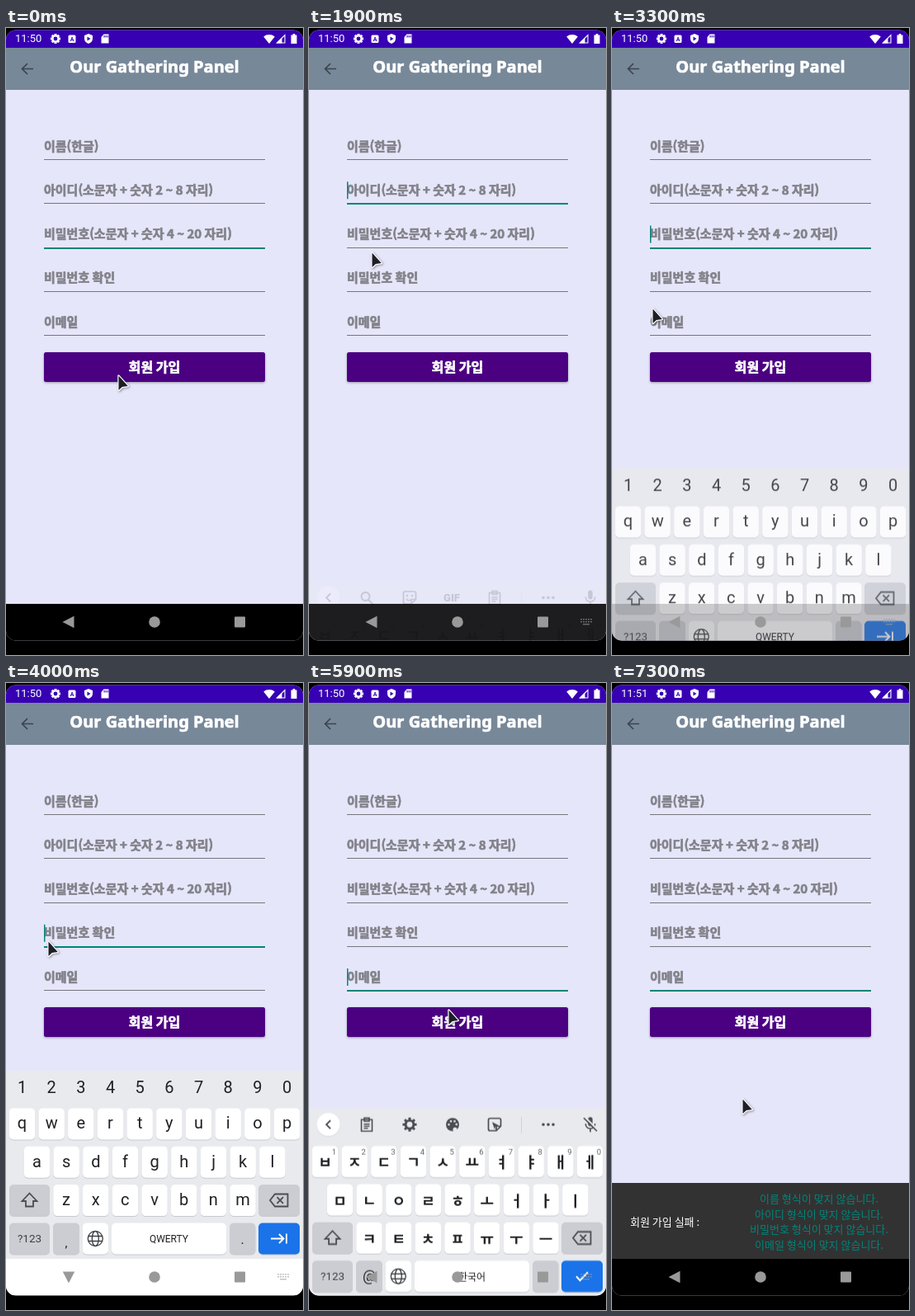
Animation of 360 by 760 pixels, one loop 7400 ms. Source, as an HTML page with a canvas:

```html
<!DOCTYPE html>
<html lang="ko">
<head>
<meta charset="utf-8">
<style>
html, body { margin: 0; width: 100%; height: 100%; overflow: hidden; background: #000; }
canvas { display: block; width: 360px; height: 760px; }
</style>
</head>
<body>
<canvas id="stage"></canvas>
<script>
const LOOP = 7400, STEP = 100, KB_TOP = 470, KB_H = 272, NAV = 698;
const KR = '"Noto Sans CJK KR", "Noto Sans CJK", sans-serif';
const LATIN = 'Roboto, sans-serif';
const TEAL = '#00857a', INK = '#202124', GREY = '#4a4d52';
const scale = window.devicePixelRatio || 1;

function makeLayer(canvas, w, h) {
  canvas.width = w * scale;
  canvas.height = h * scale;
  const c = canvas.getContext('2d');
  c.scale(scale, scale);
  return c;
}
const screen = makeLayer(document.getElementById('stage'), 360, 760);
const kbCanvas = document.createElement('canvas');
const kb = makeLayer(kbCanvas, 360, KB_H);
let g = screen;

const clamp = v => Math.max(0, Math.min(1, v));
const mix = (a, b, u) => a + (b - a) * u;

// cubic-bezier(.2, 0, 0, 1)
function ease(x) {
  if (x <= 0) return 0;
  if (x >= 1) return 1;
  let lo = 0, hi = 1;
  for (let i = 0; i < 24; i++) {
    const m = (lo + hi) / 2;
    if (.6 * m * (1 - m) ** 2 + m ** 3 < x) lo = m; else hi = m;
  }
  return 3 * lo * lo - 2 * lo ** 3;
}

function rect(x, y, w, h, color, r = 0) {
  g.fillStyle = color;
  g.beginPath();
  g.roundRect(x, y, w, h, r);
  g.fill();
}
function disc(x, y, r, color) {
  g.fillStyle = color;
  g.beginPath();
  g.arc(x, y, r, 0, 7);
  g.fill();
}
function text(s, x, y, size, color, align = 'left', family = LATIN, weight = 400) {
  g.font = `${weight} ${size}px ${family}`;
  g.fillStyle = color;
  g.textAlign = align;
  g.textBaseline = 'middle';
  g.fillText(s, x, y);
}
// extra-bold display lettering
function heavy(s, x, y, size, color, align, family) {
  text(s, x, y, size, color, align, family, 700);
  g.strokeStyle = color;
  g.lineWidth = .7;
  g.lineJoin = 'round';
  g.strokeText(s, x, y);
}
// SVG path centred on x, y; filled, or stroked when a width is given
function icon(d, x, y, color, width = 0, angle = 0) {
  g.save();
  g.translate(x, y);
  g.rotate(angle);
  const p = new Path2D(d);
  if (width) {
    g.strokeStyle = color;
    g.lineWidth = width;
    g.stroke(p);
  } else {
    g.fillStyle = color;
    g.fill(p, 'evenodd');
  }
  g.restore();
}
function gear(x, y, r, color, hole) {
  for (let i = 0; i < 4; i++) icon(`M${-r} -1.5H${r}V1.5H${-r}Z`, x, y, color, 0, i * Math.PI / 4);
  disc(x, y, r * .75, color);
  disc(x, y, r * .4, hole);
}

// ---- app ----

const FIELDS = ['이름(한글)', '아이디(소문자 + 숫자 2 ~ 8 자리)',
  '비밀번호(소문자 + 숫자 4 ~ 20 자리)', '비밀번호 확인', '이메일'];
const FOCUS = [[0, 2], [400, 0], [1800, 1], [3100, 2], [4000, 3], [5600, 4]];

function statusBar(t) {
  rect(0, 0, 360, 24, '#3700b3');
  text(t < 6400 ? '11:50' : '11:51', 11, 13.5, 13, '#fff');
  gear(60, 13, 6, '#fff', '#3700b3');
  rect(75.5, 8.5, 9, 9.5, '#fff', 1.5);
  text('A', 80, 13.6, 7, '#3700b3', 'center', LATIN, 700);
  icon('M0 -6L5 -4V0C5 3 3 5 0 6C-3 5 -5 3 -5 0V-4Z', 100, 13, '#fff');
  icon('M-1.5 -2.5L2.5 0L-1.5 2.5Z', 100, 13, '#3700b3');
  icon('M-4.5 -2L-1.5 -5.5H4.5V5.5H-4.5ZM-1.5 -4V-1.5H-.4V-4ZM.6 -4V-1.5H1.6V-4ZM2.6 -4V-1.5H3.6V-4Z', 120, 13, '#fff');
  icon('M0 5.5L-6.8 -3C-3 -6.3 3 -6.3 6.8 -3Z', 319, 13.5, '#fff');
  icon('M5 -4.5V5H-4.5Z', 333, 13, '#fff', 1.1);
  icon('M1.5 -1.5V5.5H-5.5Z', 333, 13, '#fff');
  icon('M-3.5 -4.5H-1.3V-6H1.3V-4.5H3.5V6H-3.5Z', 349, 13, '#fff');
}

function button() {
  g.save();
  g.shadowColor = 'rgba(0,0,0,.35)';
  g.shadowBlur = 3 * scale;
  g.shadowOffsetY = scale;
  rect(46, 393, 268, 36, '#4b0082', 2.5);
  g.restore();
  heavy('회원 가입', 180, 410.5, 16, '#fff', 'center', KR);
}

function form(t) {
  rect(0, 24, 360, 51, '#778899');
  icon('M7 0H-6M0 -6.5L-6.5 0L0 6.5', 26, 49.5, '#3b454e', 1.7);
  heavy('Our Gathering Panel', 180, 48.5, 20, '#fff', 'center', '"Noto Sans", sans-serif');

  const [since, focused] = FOCUS.filter(f => f[0] <= t).pop();
  FIELDS.forEach((label, i) => {
    const y = 143 + i * 53.25;
    heavy(label, 46, y, 15, '#82828a', 'left', KR);
    const line = Math.round(y + 16);
    if (i === focused) rect(46, line, 268, 2, TEAL);
    else rect(46, line, 268, 1, '#76767f');
    const caretOn = since > 0 && (t - since) % 1000 < 500;
    if (i === focused && caretOn) rect(46, y - 10, 1.5, 21, TEAL);
  });
  button();
}

function snackbar(t) {
  const y = 606 + 92 * (1 - ease((t - 6720) / 250));
  if (y >= NAV) return;
  rect(0, y, 360, 92, '#323232');
  text('회원 가입 실패 :', 22, y + 47, 13, '#fff', 'left', KR);
  ['이름', '아이디', '비밀번호', '이메일'].forEach((name, i) =>
    text(`${name} 형식이 맞지 않습니다.`, 251, y + 19 + i * 18.7, 13, TEAL, 'center', KR));
}

// ---- keyboard ----

const ROWS = {
  ko: ['ㅂㅈㄷㄱㅅㅛㅕㅑㅐㅔ', 'ㅁㄴㅇㄹㅎㅗㅓㅏㅣ', 'ㅋㅌㅊㅍㅠㅜㅡ'],
  en: ['qwertyuiop', 'asdfghjkl', 'zxcvbnm']
};
const SHOWS = [
  { from: 450, until: 1050, layout: 'ko' },
  { from: 1864, until: 2450, layout: 'ko' },
  { from: 3197, until: 4453, layout: 'en' },
  { from: 5776, until: 6350, layout: 'mail' }
];

function key(x, y, w, color = '#fff') {
  rect(x, y - 18, w, 38, '#c8cacf', 5);
  rect(x, y - 19, w, 38, color, 5);
}
function clipboard(x, y) {
  icon('M-6.5 -6H6.5V8H-6.5ZM-3 -6V-8H3V-4H-3ZM-3.5 -.5H3.5M-3.5 2H3.5M-3.5 4.5H1.5', x, y, GREY, 1.6);
}
function mic(x, y, off) {
  rect(x - 2.7, y - 9, 5.4, 11, GREY, 2.7);
  icon('M-5.7 -1C-5.7 7 5.7 7 5.7 -1M0 5V9', x, y, GREY, 1.7);
  if (off) {
    icon('M-8 -8L8 8', x + 1.3, y - 1.3, '#e8eaed', 2);
    icon('M-8 -8L8 8', x, y, GREY, 1.7);
  }
}
function sticker(x, y) {
  icon('M-5.5 -7.5H5.5Q7.5 -7.5 7.5 -5.5V2L2 7.5H-5.5Q-7.5 7.5 -7.5 5.5V-5.5Q-7.5 -7.5 -5.5 -7.5ZM7.5 2H2V7.5', x, y, GREY, 1.7);
}
function toolbar(mail) {
  const y = 19.5;
  disc(23.5, y + .8, 14, '#d0d3d7');
  disc(23.5, y, 14, '#fff');
  icon('M2.5 -5L-2.5 0L2.5 5', 23.5, y, GREY, 1.8);
  if (mail) {
    clipboard(70, y);
    gear(122, y, 8.5, GREY, '#e8eaed');
    disc(174, y, 8, GREY);
    [[-4.5, 0], [-2, -4], [2.5, -4], [4.8, -.2]].forEach(([dx, dy]) => disc(174 + dx, y + dy, 1.3, '#e8eaed'));
    disc(177, y + 6, 2.6, '#e8eaed');
    sticker(225, y);
    icon('M-3 -3L5 1L1 2L0 6Z', 225, y, GREY);
  } else {
    icon('M3.5 -1.5A5 5 0 1 1 -6.5 -1.5A5 5 0 1 1 3.5 -1.5M2 2.5L8 8.5', 70, y, GREY, 1.9);
    sticker(122, y);
    disc(119, y - 2.5, 1.2, GREY);
    disc(125, y - 2.5, 1.2, GREY);
    icon('M-4 1C-3 4 1 4 2 2', 122, y, GREY, 1.4);
    text('GIF', 173, y + .5, 13, GREY, 'center', LATIN, 900);
    clipboard(225, y);
  }
  rect(257, 10, 1, 20, '#cfd2d6');
  [-6, 0, 6].forEach(dx => disc(290 + dx, y, 1.8, GREY));
  mic(341, y, mail);
}

function keyboard(layout) {
  const english = layout === 'en', mail = layout === 'mail';
  const mod = '#cbcdd2', pitch = 35.67;
  rect(0, 0, 360, KB_H, '#e8eaed');
  if (english) [...'1234567890'].forEach((d, i) => text(d, 19.5 + i * pitch, 21.5, 20, INK, 'center'));
  else toolbar(mail);

  ROWS[english ? 'en' : 'ko'].forEach((row, r) => {
    const y = 64.5 + r * 46.3, x0 = [19.5, 37.5, 73][r];
    [...row].forEach((ch, i) => {
      const x = x0 + i * pitch;
      key(x - 15.7, y, 31.4);
      if (english) text(ch, x, y, 20, INK, 'center');
      else {
        text(ch, x, y + 1, 18, INK, 'center', KR, 700);
        if (r === 0) text((i + 1) % 10, x + 11, y - 11.5, 9.5, '#5f6368', 'center');
      }
    });
  });

  const y3 = 157, y4 = 203.5;
  key(4, y3, 49, mod);
  icon('M0 -8.5L9 1H4.5V7.5H-4.5V1H-9Z', 28.5, y3, GREY, 1.8);
  key(306, y3, 50, mod);
  icon('M-11 0L-5 -7.5H10.5V7.5H-5ZM-2.5 -3.8L5 3.8M5 -3.8L-2.5 3.8', 331, y3, GREY, 1.8);

  key(4, y4, 49, mod);
  text('?123', 28.5, y4 + .5, 13.5, '#3c4043', 'center');
  key(57, y4, 32, mod);
  if (mail) text('@', 73, y4, 18, INK, 'center');
  else text(',', 73, y4 + 6, 15, INK, 'center');
  if (layout === 'ko')
    icon('M4.5 0A4.5 4.5 0 1 1 -4.5 0A4.5 4.5 0 1 1 4.5 0M-2.3 1C-1.5 3 1.5 3 2.3 1M-1.7 -2V-.8M1.7 -2V-.8', 73, y4 - 8, GREY, 1);
  key(92.7, y4, 31.4);
  icon('M9 0A9 9 0 1 1 -9 0A9 9 0 1 1 9 0M4 0A4 9 0 1 1 -4 0A4 9 0 1 1 4 0M-8 -3H8M-8 3H8', 108.3, y4, '#3c4043', 1.3);
  key(128, y4, 139);
  text(english ? 'QWERTY' : '한국어', 197.5, y4 + .5, 12, INK, 'center', english ? LATIN : KR);
  key(271, y4, 31.4, mod);
  text('.', 286.7, y4 + 2, 16, INK, 'center');
  key(306, y4, 50, '#1a73e8');
  icon(mail ? 'M-7 0L-2.5 5L7 -5' : 'M-10 0H5M0 -5.5L5.5 0L0 5.5M9 -6V6', 331, y4, '#fff', 1.9);
  rect(0, 228, 360, 44, '#fff');
}

function keyboardState(t) {
  const show = SHOWS.find(s => t >= s.from && t < s.until + 300);
  if (!show) return { light: 0, angle: 0 };
  if (t < show.until) {
    const u = (t - show.from) / 285;
    return {
      layout: show.layout, offset: KB_H * (1 - ease(u)), alpha: clamp(2.6 * u - .12),
      light: clamp(2.9 * u - .24), switcher: true,
      angle: -Math.PI / 2 * clamp((t - show.from - 130) / 150)
    };
  }
  const e = ((t - show.until) / 300) ** 2;
  return {
    layout: show.layout, offset: KB_H * e, alpha: clamp(1 - 2 * e),
    light: clamp(1 - 2.7 * e), angle: Math.PI / 2 * (1 - e ** 3)
  };
}

function drawKeyboard(state) {
  if (!state.layout) return;
  g = kb;
  keyboard(state.layout);
  g = screen;
  g.globalAlpha = state.alpha;
  g.drawImage(kbCanvas, 0, KB_TOP + state.offset, 360, KB_H);
  g.globalAlpha = 1;
}

function navBar(state) {
  rect(0, NAV, 360, 62, `rgba(0,0,0,${1 - state.light})`);
  const c = '#999', faint = 'rgba(153,153,153,.6)';
  icon('M-7.5 0L6.5 -7.2V7.2Z', 76, 720, c, 0, state.angle);
  disc(180, 720, 6.8, c);
  rect(277, 713.5, 13, 13, c, 1);
  if (!state.switcher) return;
  for (let r = 0; r < 2; r++)
    for (let i = 0; i < 5; i++) rect(329 + i * 3, 716 + r * 3, 2, 1.6, faint);
  rect(332, 722, 8, 1.6, faint);
}

// ---- pointer: time, x, y ----

const PATH = [
  [0, 135, 419], [50, 135, 419], [200, 48, 162], [400, 48, 162], [800, 11, 238], [1100, 20, 232],
  [1700, 64, 208], [1800, 66, 212], [1900, 75, 270], [2400, 64, 290], [2900, 56, 258],
  [3100, 50, 262], [3300, 48, 338], [3700, 52, 322], [4000, 50, 311], [4600, 33, 402],
  [5100, 42, 367], [5400, 140, 368], [5600, 140, 368], [5900, 168, 394], [6300, 160, 414],
  [6700, 157, 411], [7100, 157, 414], [7300, 157, 502], [LOOP, 157, 502]
];

function pointer(t) {
  const i = PATH.findIndex(p => p[0] > t);
  const [t0, x0, y0] = PATH[i - 1], [t1, x1, y1] = PATH[i];
  const u = (t - t0) / (t1 - t0);
  g.save();
  g.translate(mix(x0, x1, u), mix(y0, y1, u));
  const shape = new Path2D('M1.5 2.5V20L5.8 16L12.8 15Z');
  g.lineJoin = 'round';
  g.shadowColor = 'rgba(0,0,0,.4)';
  g.shadowBlur = 3 * scale;
  g.shadowOffsetX = g.shadowOffsetY = scale;
  g.strokeStyle = '#fff';
  g.lineWidth = 2.4;
  g.stroke(shape);
  g.shadowColor = 'transparent';
  g.fillStyle = '#1e1e28';
  g.fill(shape);
  g.restore();
}

function draw(t) {
  rect(0, 0, 360, 760, '#000');
  g.save();
  g.beginPath();
  g.roundRect(0, 2.5, 360, 740, 12);
  g.clip();
  rect(0, 0, 360, 760, '#e6e6fa');
  statusBar(t);
  form(t);
  snackbar(t);
  const state = keyboardState(t);
  drawKeyboard(state);
  navBar(state);
  pointer(t);
  g.restore();
}

const start = performance.now();
let last = -1;
function tick() {
  const t = Math.floor((performance.now() - start) % LOOP / STEP) * STEP;
  if (t !== last) draw(last = t);
  requestAnimationFrame(tick);
}
tick();
</script>
</body>
</html>
```
